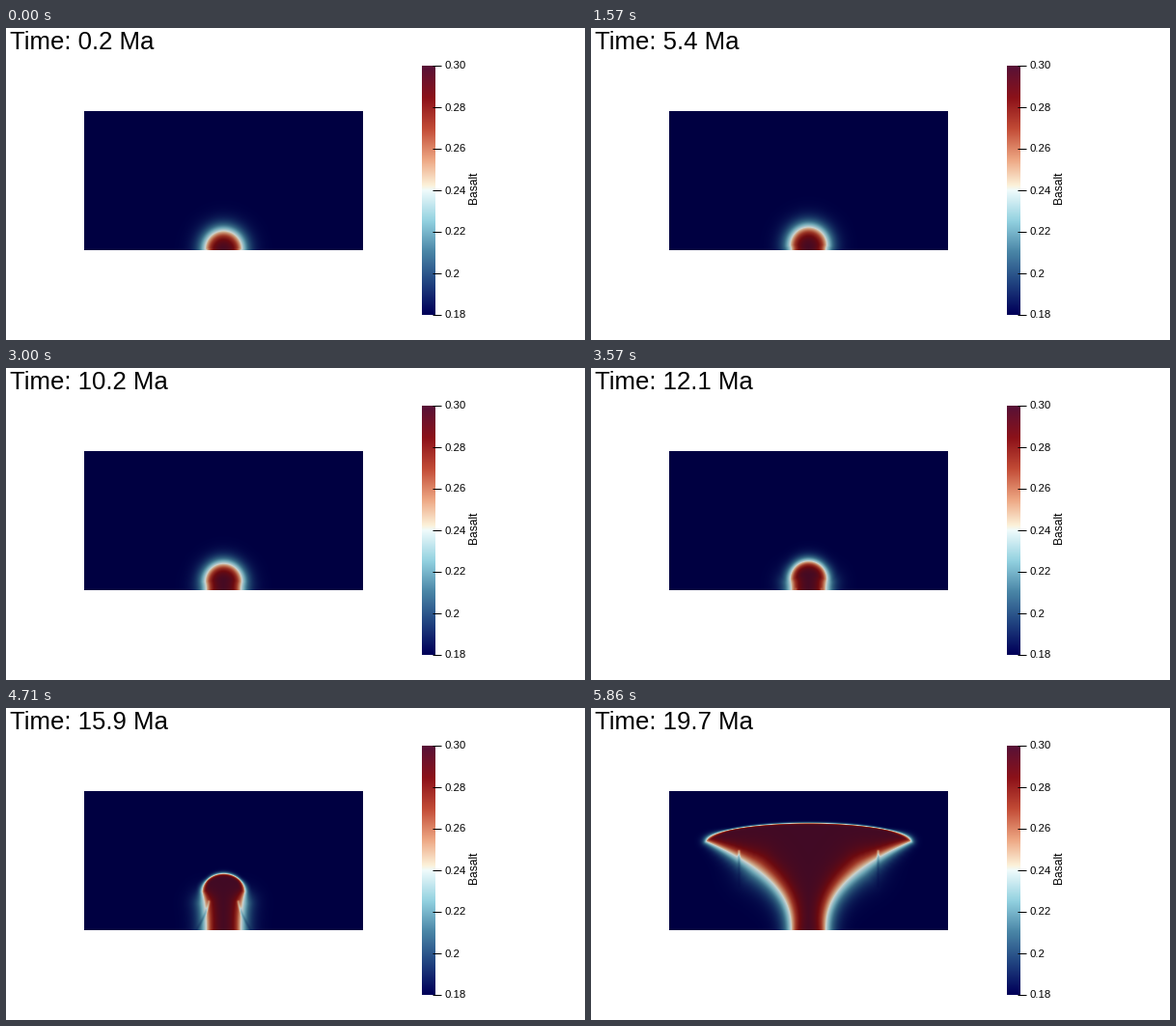
Animation of 600x323 px, one loop 6.01 s. Source, as a matplotlib script:

```python
import numpy as np
import matplotlib.pyplot as plt
from matplotlib.animation import FuncAnimation
from matplotlib.colors import LinearSegmentedColormap
from matplotlib.path import Path

WIDTH, HEIGHT, DPI = 600, 323, 100
STEPS, TICKS_PER_STEP, LOOP_MS = 42, 5, 6010
TICKS = STEPS * TICKS_PER_STEP
LEFT, RIGHT, TOP, BOTTOM = 81, 370, 86, 230
STEM, CAP_DEPTH = 18, 19

RAMP = [(0, "#000059"), (.125, "#204380"), (.25, "#4985a6"), (.375, "#92d1e0"),
        (.5, "#f0fbfc"), (.52, "#fcf1d9"), (.625, "#eda682"), (.75, "#c24b36"),
        (.875, "#8c1119"), (1, "#591236")]
bar_map = LinearSegmentedColormap.from_list("bar", RAMP)
# The lit surface is darker than the legend.
shades = .83 * bar_map(np.linspace(0, 1, 256))[:, :3] ** 1.12

cols = (RIGHT - LEFT + 1) // 2
rows = BOTTOM - TOP
grid_x, grid_y = np.meshgrid(np.arange(cols, dtype=float), rows - .5 - np.arange(rows))
grid = np.column_stack([grid_x.ravel(), grid_y.ravel()])


def logistic(step, middle, width):
    return 1 / (1 + np.exp((middle - step) / width))


def nearest(points, *spreads):
    """Smallest distance to a polyline, divided by each spread along it."""
    best = [np.full(grid_x.shape, 1e3) for _ in spreads]
    for j, (p, q) in enumerate(zip(points[:-1], points[1:])):
        dx, dy = q - p
        along = ((grid_x - p[0]) * dx + (grid_y - p[1]) * dy) / (dx * dx + dy * dy + 1e-9)
        along = np.clip(along, 0, 1)
        dist = np.hypot(grid_x - p[0] - along * dx, grid_y - p[1] - along * dy)
        for found, spread in zip(best, spreads):
            width = spread[j] + along * (spread[j + 1] - spread[j])
            np.minimum(found, dist / width, out=found)
    return best


def field(step):
    """Composition from 0 to 1: a flaring stem under a half-ellipse cap."""
    flare = np.exp((step - STEPS + 1) / 2.43)
    sharp = logistic(step, 26.5, 3)
    height = 20 + .35 * step + 82 * logistic(step, 34.7, 2.4)
    rim_x = STEM + 1 + 87 * flare
    rim_y = height - CAP_DEPTH

    q = np.linspace(0, 1, 30)
    angle = np.linspace(0, np.pi / 2, 40)
    flank = np.column_stack([STEM + (rim_x - STEM) * q ** 2.4, rim_y * q])
    cap = np.column_stack([rim_x * np.cos(angle), rim_y + CAP_DEPTH * np.sin(angle)])
    curve = np.vstack([[(STEM, -14)], flank, cap])

    def spread(base, side, top):
        rim = np.sqrt(side * top)
        return np.concatenate([[base], np.interp(q, [0, .7, 1], [base, side, rim]),
                               np.interp(angle, [0, .7], [rim, top])])

    crown = .9 + 7.7 * (1 - sharp)
    far_out, far_in = nearest(curve, spread(8.6, 8.6 + 4 * flare, crown),
                              spread(8.5, 8.5 + 7 * flare, 1.1 * crown))
    outline = np.vstack([curve, [(-2, height), (-2, -14)]])
    inside = Path(outline).contains_points(grid).reshape(grid_x.shape)
    value = np.where(inside, .5 + .5 * np.tanh(far_in), .5 * np.exp(-far_out ** 1.215))

    # Faint dark streak trailing from under the rim.
    wisp = np.column_stack([.68 * rim_x + 18 * (1 - flare) * q ** 1.4, rim_y - 10 - 36 * q])
    gap, = nearest(wisp, np.full(len(q), 1.4))
    value *= 1 - .22 * sharp * np.exp(-gap ** 2)
    return np.hstack([value[:, :0:-1], value])


def render(step):
    levels = np.clip(field(step) * 255, 0, 255)
    return np.stack([np.interp(levels, np.arange(256), shades[:, c]) for c in range(3)], -1)


fig = plt.figure(figsize=(WIDTH / DPI, HEIGHT / DPI), dpi=DPI, facecolor="white")
ax = fig.add_axes([0, 0, 1, 1])
ax.axis("off")


def label(x, y, text, px, **options):
    return ax.text(x, y, text, fontsize=px * 72 / DPI, family="Liberation Sans",
                   color="black", **options)


pictures = [render(step) for step in range(STEPS)]
plume = ax.imshow(pictures[0], extent=(LEFT, RIGHT, BOTTOM, TOP), interpolation="nearest")
ax.imshow(np.linspace(1, 0, 258)[:, None], cmap=bar_map, extent=(431, 445, 297, 39),
          interpolation="nearest")
for k in range(7):
    y = 39 + 43 * k
    name = "0.2" if k == 5 else f"{.30 - .02 * k:.2f}"
    ax.plot([442, 451], [y - .5, y - .5], color="black", lw=.72, solid_capstyle="butt")
    label(454.5, y + 3.5, name, 11.4)
label(485, 165.5, "Basalt", 12, rotation=90, ha="center", va="center")
clock = label(4.5, 22, "", 25.7)
ax.set(xlim=(0, WIDTH), ylim=(HEIGHT, 0), aspect="auto")


def update(tick):
    # Each step comes one tick early, as steps run slightly faster than LOOP_MS / STEPS.
    step = min((tick + 1) // TICKS_PER_STEP, STEPS - 1)
    plume.set_data(pictures[step])
    clock.set_text(f"Time: {.2 + 19.5 * step / (STEPS - 1):.1f} Ma")
    return plume, clock


anim = FuncAnimation(fig, update, frames=TICKS, interval=LOOP_MS / TICKS,
                     repeat=True, repeat_delay=0)
plt.show()
```
